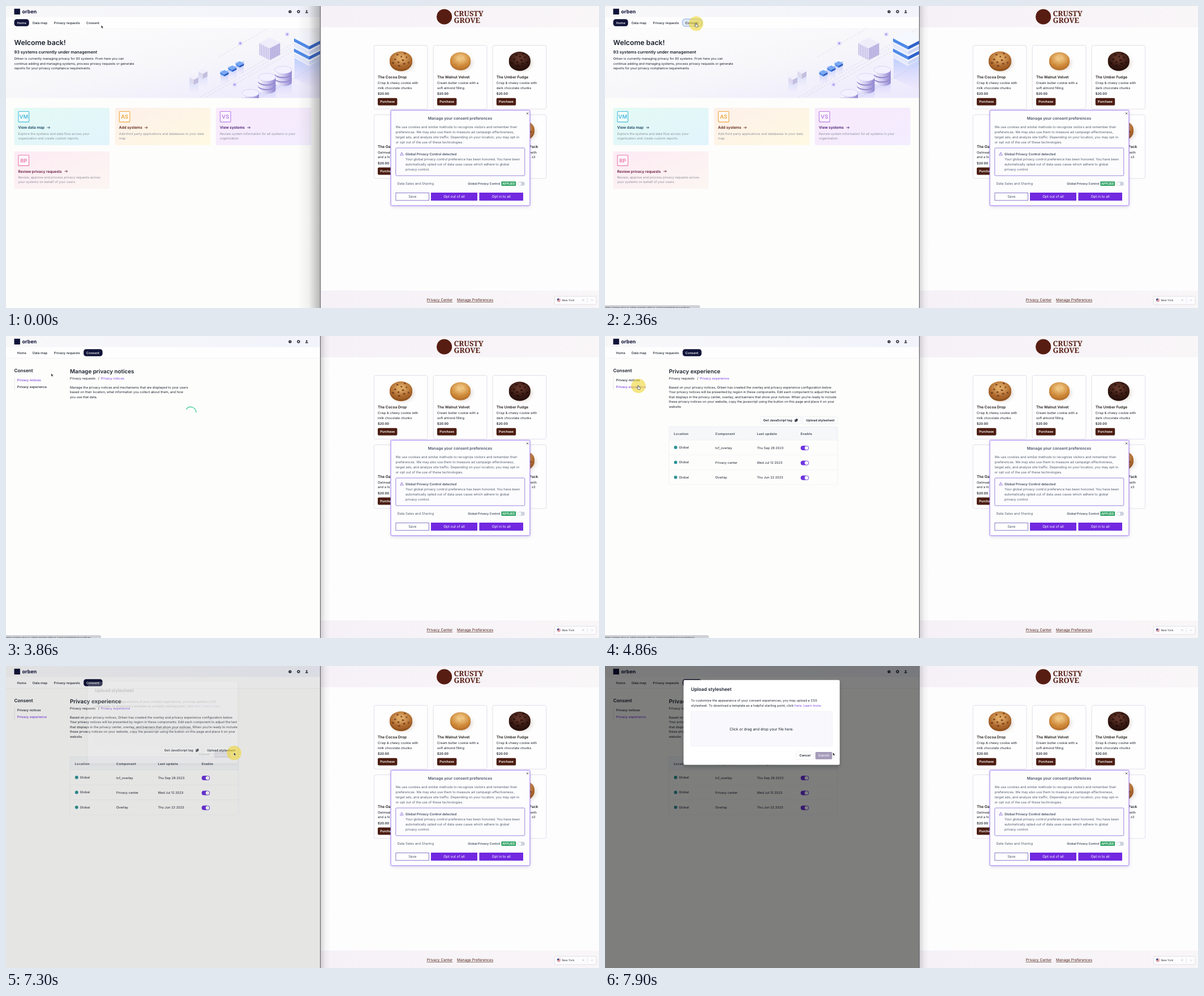
Recreate the animation shown at these times as an HTML page. Size 1048x534 px, loop 8 s.

```html
<!DOCTYPE html>
<html lang="en">
<head>
<meta charset="utf-8">
<title>Consent settings walkthrough</title>
<style>
html, body { margin: 0; width: 100%; height: 100%; overflow: hidden; background: #fdfdfc; }
svg { display: block; width: 1048px; height: 534px; font-family: Inter, "Open Sans", sans-serif; text-rendering: geometricPrecision; }
text { white-space: pre; }
</style>
</head>
<body>
<svg id="stage" viewBox="0 0 1048 534"></svg>
<script>
const LOOP = 8000;
const SM = 5.72, MD = 6.54, LG = 8.18, XL = 9.82;
const INK = '#1a202c', NAVY = '#111439', PURPLE = '#7c3fe0', BROWN = '#4c1d12', SLATE = '#525c6c';

// ---- drawing helpers (text is placed by the middle of its capitals) ----
const text = (x, y, str, size = SM, fill = INK, weight = 400, more = '') =>
  `<text x="${x}" y="${(y + size * .36).toFixed(2)}" font-size="${size}" fill="${fill}" font-weight="${weight}" ${more}>${str}</text>`;
const mid = (x, y, str, size, fill, weight) => text(x, y, str, size, fill, weight, 'text-anchor="middle"');
const lines = (x, y, step, rows, size, fill) => rows.map((r, i) => text(x, y + i * step, r, size, fill)).join('');
const rect = (x, y, w, h, fill, r = 0, more = '') =>
  `<rect x="${x}" y="${y}" width="${w}" height="${h}" rx="${r}" fill="${fill}" ${more}/>`;
const path = (d, fill, more = '') => `<path d="${d}" fill="${fill}" ${more}/>`;
const stroke = (d, color, w = 1, more = '') => path(d, 'none', `stroke="${color}" stroke-width="${w}" ${more}`);
const ellipse = (x, y, rx, ry, fill, more = '') => `<ellipse cx="${x}" cy="${y}" rx="${rx}" ry="${ry}" fill="${fill}" ${more}/>`;
const dot = (x, y, r, fill, more) => ellipse(x, y, r, r, fill, more);
const group = (id, body, more = '') => `<g id="${id}" ${more}>${body}</g>`;
const linear = (id, dir, ...stops) => `<linearGradient id="${id}" ${dir}>${stops.map((s, i) =>
  `<stop offset="${i / (stops.length - 1)}" stop-color="${s[0]}" stop-opacity="${s[1] ?? 1}"/>`).join('')}</linearGradient>`;
const radial = (id, a, b) => `<radialGradient id="${id}" cy=".38"><stop offset=".25" stop-color="${a}"/><stop offset="1" stop-color="${b}"/></radialGradient>`;

const ACROSS = 'x2="1" y2="0"', DOWN = 'x2="0" y2="1"', SLANT = 'x2="1" y2="1"';
const defs = `<defs>
  ${linear('top', ACROSS, ['#f8f8f9'], ['#f2f3fb'])}
  ${linear('hero', SLANT, ['#fdfdfd'], ['#f7f7fa'], ['#ece8fd'])}
  ${linear('shop', ACROSS, ['#f5f1f7'], ['#f9f6f8'])}
  ${linear('vm', SLANT, ['#e3faf4'], ['#e2f4fc'])}
  ${linear('as', SLANT, ['#fdf0ea'], ['#fff9e2'])}
  ${linear('vs', SLANT, ['#f8e9fb'], ['#f3edff'])}
  ${linear('rp', SLANT, ['#fdebf4'], ['#fcf6f2'])}
  ${linear('shadeL', ACROSS, ['#444', 0], ['#444', .07], ['#444', .38])}
  ${linear('shadeR', ACROSS, ['#444', .2], ['#444', .05], ['#444', 0])}
  ${linear('side', ACROSS, ['#fbfaff'], ['#cfc8ee'], ['#8f83cf'])}
  ${linear('glow', DOWN, ['#7fa8ff', .45], ['#b9a6ff', 0])}
  ${radial('cookie0', '#dfa863', '#a9642a')}
  ${radial('cookie1', '#efc582', '#cb8434')}
  ${radial('cookie2', '#603429', '#32160f')}
  <clipPath id="heroClip"><rect y="40" width="555" height="122.5"/></clipPath>
  <filter id="soft" x="-20%" y="-20%" width="140%" height="140%"><feGaussianBlur stdDeviation="3"/></filter>
</defs>`;

// ---- hero illustration ----
function block(x, y, w, h, top, left, right) {
  const k = w * .52;
  return path(`M${x - w} ${y}L${x} ${y + k}V${y + k + h}L${x - w} ${y + h}Z`, left)
    + path(`M${x + w} ${y}L${x} ${y + k}V${y + k + h}L${x + w} ${y + h}Z`, right)
    + path(`M${x} ${y - k}L${x + w} ${y}L${x} ${y + k}L${x - w} ${y}Z`, top);
}
function drum(x, y, r, count) {
  let out = rect(x - r, y + 12, r * 2, 32, 'url(#glow)');
  for (let i = count - 1; i >= 0; i--) {
    const b = y + i * 8;
    out += path(`M${x - r} ${b}V${b + 6}A${r} ${r * .45} 0 0 0 ${x + r} ${b + 6}V${b}Z`, 'url(#side)')
      + ellipse(x, b, r, r * .45, i ? '#8d82c8' : '#f3f0ff', 'stroke="#c2b8ee" stroke-width=".5"');
  }
  return out;
}
function art() {
  let out = '';
  for (const d of ['M300 186L555 39', 'M345 166L505 74', 'M376 90L462 40', 'M404 139L556 51', 'M440 168L556 101'])
    out += stroke(d, '#c9c6d8', .6, 'stroke-dasharray="3 2.4"');
  out += path('M510 92L535 106L560 92V150L535 140L510 128Z', 'url(#glow)');
  for (let i = 3; i >= 0; i--)
    out += block(536, 57 + i * 9, 27, 6, i ? '#eef2ff' : '#f6f8ff', i % 2 ? '#e3e8fb' : '#4f8ae8', i % 2 ? '#cbd5f5' : '#2f62c9');
  out += block(466, 65, 18.5, 21, '#f0edfb', '#e2def5', '#c4bde6');
  for (let i = 0; i < 6; i++)
    out += stroke(`M${448.5 + i * 3} ${67 + i * 1.55}v20M${483.5 - i * 3} ${67 + i * 1.55}v20`, '#a9a1d6', .7);
  for (const [x, y] of [[413, 97], [400, 104.5], [386, 112.5]])
    out += rect(x - 7, y + 6, 14, 18, 'url(#glow)')
      + block(x, y, 7.5, 3, '#f5f8ff', '#dbe6fd', '#b5c9f5') + block(x, y + 4.5, 7.5, 3.5, '#7aa8f3', '#4d88e6', '#2c5cc0');
  for (const [x, y] of [[348, 115.5], [332, 126]])
    out += rect(x - 8, y + 8, 16, 20, 'url(#glow)', 0, 'opacity=".5"') + block(x, y, 8, 9, '#f1effa', '#dedaf0', '#c3bedf');
  out += drum(490, 113, 15, 3) + drum(461, 126, 15.5, 3) + drum(432, 154, 15, 2);
  for (const [x, y] of [[414, 66], [497, 50], [404, 139]])
    out += dot(x, y, 4, '#d9ceff', 'opacity=".55"') + dot(x, y, 1.6, '#9a83ec');
  return out;
}

// ---- left window ----
const arrow = (x, y, c) => stroke(`M${x} ${y}h5M${x + 3} ${y - 2}l2 2l-2 2`, c, .8);
function card(x, y, id, mark, title, ax, tone, ink, rows) {
  return rect(x, y, 168.5, 66, `url(#${id})`, 2)
    + rect(x + 7.5, y + 6.5, 18.6, 18.6, '#fff8', 1, `stroke="${tone}" stroke-width="1.1"`)
    + mid(x + 16.8, y + 16, mark, 9.4, tone, 600)
    + text(x + 7, y + 35, title, MD, ink, 600) + arrow(ax, y + 35, ink)
    + lines(x + 7, y + 45.8, 8.2, rows, SM, '#8a909c');
}
const homePage = rect(0, 39.5, 555, 123, 'url(#hero)')
  + `<g clip-path="url(#heroClip)">${art()}</g>`
  + text(14.5, 65, 'Welcome back!', 12.27, INK, 600)
  + text(14.5, 81.6, '93 systems currently under management', 7.36, INK, 600)
  + lines(14.5, 93, 8.6, ['Orben is currently managing privacy for 93 systems. From here you can',
    'continue adding and managing systems, process privacy requests or generate',
    'reports for your privacy compliance requirements.'])
  + card(14.5, 180, 'vm', 'VM', 'View data map', 72.5, '#45b8dc', '#14405c',
    ['Explore the systems and data flow across your', 'organization and create custom reports.'])
  + card(192.8, 180, 'as', 'AS', 'Add systems', 245, '#eda83c', '#5c1c12',
    ['Add third party applications and databases to your data', 'map'])
  + card(371, 180, 'vs', 'VS', 'View systems', 426.5, '#b97be6', '#43166e',
    ['Review system information for all systems in your', 'organization'])
  + card(14.5, 257.3, 'rp', 'RP', 'Review privacy requests', 103.5, '#ea78ad', '#64143f',
    ['Review, approve and process privacy requests across', 'your systems on behalf of your users.']);

const pageHead = (title, crumb) => text(113, 62, title, XL, INK, 600)
  + text(113, 75.4, 'Privacy requests') + text(162.7, 75.4, '/') + text(167.7, 75.4, crumb, SM, PURPLE);

const noticesPage = pageHead('Manage privacy notices', 'Privacy notices')
  + lines(113, 90.6, 8.6, ['Manage the privacy notices and mechanisms that are displayed to your users',
    'based on their location, what information you collect about them, and how', 'you use that data.'])
  + group('spinner', stroke('M-7.8 -5.4A9.5 9.5 0 0 1 9.5 0', '#2cc78c', 1.1, 'stroke-linecap="round"'));

const row = (y, name, date) => dot(124.8, y, 2.9, '#2d8fb4') + path(`M122.5 ${y - 1.5}q2 -1.6 3 0t-.8 3.4q-2 -.6 -2.2 -3.4`, '#2f9d63')
  + text(130.8, y, 'Global') + text(195, y + .6, name) + text(268.5, y + .6, date)
  + rect(345.8, y - 3, 14.4, 8, '#6d35dd', 4) + dot(356.1, y + 1, 3.2, '#fff')
  + stroke(`M113 ${y + 13.2}H411`, '#eceef2', .6);
const head = (x, s) => text(x, 172.8, s, SM, '#374151', 600, 'letter-spacing=".29"');
const button = (x, w, id = '') => rect(x, 142.8, w, 12.6, '#fefefe', 1.5, `id="${id}" stroke="#dfe3ea" stroke-width=".6"`);
const experiencePage = pageHead('Privacy experience', 'Privacy experience')
  + lines(113, 90.6, 8.6, ['Based on your privacy notices, Orben has created the overlay and privacy experience configuration below.',
    'Your privacy notices will be presented by region in these components. Edit each component to adjust the text',
    'that displays in the privacy center, overlay, and banners that show your notices. When you’re ready to include',
    'these privacy notices on your website, copy the javascript using the button on this page and place it on your',
    'website.'])
  + button(274.6, 71.6, 'copy') + text(279.8, 149, 'Get JavaScript tag', SM, INK, 600)
  + rect(335.4, 147.4, 3.4, 4.4, INK, .5) + rect(337.2, 146.2, 3.4, 4.4, INK, .5, 'stroke="#fff" stroke-width=".4"')
  + button(349.6, 61.4, 'upload') + mid(380.4, 149, 'Upload stylesheet', SM, INK, 600)
  + rect(113, 160.5, 298, 23.4, '#f6f7f9', 1) + stroke('M113 263V160.5H411V263M113 184H411', '#e7e9ee', .6)
  + head(121.6, 'Location') + head(195, 'Component') + head(268.5, 'Last update') + head(345.8, 'Enable')
  + row(197, 'tcf_overlay', 'Thu Sep 28 2023') + row(223.4, 'Privacy center', 'Wed Jul 12 2023') + row(249.8, 'Overlay', 'Thu Jun 22 2023');

const sideMenu = text(14.5, 61, 'Consent', LG, INK, 600) + stroke('M15 72.5V96', '#d9dbe3', .7)
  + text(19.8, 78.3, 'Privacy notices', SM, INK, 500, 'id="linkN"')
  + text(19.8, 89.8, 'Privacy experience', SM, INK, 500, 'id="linkE"');

const topBar = rect(0, 0, 555, 19.8, 'url(#top)') + rect(0, 19.8, 555, 19.7, '#fefefe') + stroke('M0 39.5H555', '#ececf0', .6)
  + rect(14.5, 4.8, 10.4, 10.2, NAVY) + text(28.6, 10, 'orben', 8.9, NAVY, 700)
  + dot(502, 10, 2.6, INK) + mid(502, 10.1, '?', 4, '#fff', 700)
  + dot(517, 10, 1.8, 'none', `stroke="${INK}" stroke-width="1.3"`) + dot(517, 10, 2.7, 'none', `stroke="${INK}" stroke-width=".7" stroke-dasharray="1.1 1.02"`)
  + dot(531.4, 8.7, 1.3, INK) + path('M528.9 12.6q0 -2.2 2.5 -2.2t2.5 2.2Z', INK)
  + rect(137.2, 23.3, 34, 12.4, '#dfe7f1', 4.5, 'id="hover"') + rect(136.8, 22.9, 34.8, 13.2, 'none', 5, 'id="ring" stroke="#93b9ea" stroke-width="1.2"')
  + rect(14.5, 23.3, 26.2, 12.4, NAVY, 4.5, 'id="pill"')
  + text(19.6, 29.5, 'Home', SM, INK, 500, 'id="navH"') + text(47, 29.5, 'Data map', SM, INK, 500)
  + text(84.8, 29.5, 'Privacy requests', SM, INK, 500) + text(142, 29.5, 'Consent', SM, INK, 500, 'id="navC"');

const modal = rect(139, 28, 276, 150, '#000', 2, 'opacity=".22" filter="url(#soft)"') + rect(138.8, 24.8, 276, 150, '#fff', 2.2)
  + text(152, 40.8, 'Upload stylesheet', LG, INK, 600)
  + text(152, 61, 'To customize the appearance of your consent experiences, you may upload a CSS')
  + text(152, 69.6, `stylesheet. To download a template as a helpful starting point, click <tspan fill="${PURPLE}">here</tspan>. <tspan fill="${PURPLE}">Learn more</tspan>.`)
  + rect(152, 80.8, 249.6, 60.8, '#f9f9fd', 1.5, 'stroke="#d5d7e6" stroke-width=".6" stroke-dasharray="1.6 1.2"')
  + mid(276.8, 111.2, 'Click or drag and drop your file here.', MD, INK, 400)
  + rect(337.6, 152, 31.6, 13, '#fff', 1.5, 'stroke="#e4e6ec" stroke-width=".6"') + mid(353.3, 158.4, 'Cancel', SM, INK, 600)
  + rect(371.8, 152, 29.6, 13, '#a59cb9', 1.5) + mid(386.6, 158.4, 'Submit', SM, '#e9e5f1', 600);

// ---- right window ----
function cookie(x, y, kind) {
  const [rx, ry] = [[20, 16.5], [18, 15], [19, 16]][kind];
  const chip = ['#6e3a1b', '#dca255', '#1f0c08'][kind];
  let out = ellipse(x + 3, y + 4, rx, ry - 2, '#8a6a50', 'opacity=".25" filter="url(#soft)"')
    + ellipse(x, y + 2, rx, ry, ['#94551f', '#b87430', '#28100b'][kind]) + ellipse(x, y - 1, rx, ry - 1, `url(#cookie${kind})`);
  for (let i = 0; i < 11; i++) {
    const a = i * 2.4, d = Math.sqrt((i + .5) / 11) * .82;
    out += ellipse((x + Math.cos(a) * d * rx).toFixed(1), (y - 1 + Math.sin(a) * d * ry).toFixed(1), 2.2 - i % 3 * .4, 1.5, chip, `opacity="${kind == 1 ? .45 : .85}"`);
  }
  return out;
}
const frame = (x, y) => rect(x + .3, y + .3, 94.6, 112.6, '#fefefe', 3, 'stroke="#d8d2e2" stroke-width=".7"');
const product = (x, y, kind, name, rows) => frame(x, y) + cookie(x + 48, y + 27.5, kind)
  + text(x + 7, y + 56.2, name, MD, '#1d1714', 600) + lines(x + 7, y + 67, 8.3, rows)
  + text(x + 7, y + 85.7, '$20.00', SM, INK, 600)
  + rect(x + 7, y + 93.4, 34.4, 13, BROWN, 2) + mid(x + 24.2, y + 100, 'Purchase', SM, '#fff', 600);
const endText = (x, y, s, size, w) => text(x, y, s, size, INK, w, 'text-anchor="end"');
const action = (x, w, s) => rect(x, 330, w, 14.2, '#7128e0') + mid(x + w / 2, 337.2, s, 6.2, '#fff', 400);

const shop = rect(556, 0, 492, 534, '#fdfdfd') + rect(556, 0, 492, 37.6, 'url(#shop)')
  + dot(774.6, 19, 13.6, '#571d12')
  + text(791.5, 13, 'CRUSTY', 13, '#571d12', 700, 'font-family="Noto Serif, serif"')
  + text(791.5, 25.6, 'GROVE', 13, '#571d12', 700, 'font-family="Noto Serif, serif"')
  + product(650, 69.3, 0, 'The Cocoa Drop', ['Crisp &amp; chewy cookie with', 'milk chocolate chunks'])
  + product(755, 69.3, 1, 'The Walnut Velvet', ['Cream butter cookie with a', 'soft almond filling'])
  + product(859.8, 69.3, 2, 'The Umber Fudge', ['Crisp &amp; chewy cookie with', 'dark chocolate chunks'])
  + product(650, 192, 1, 'The Oa', ['Oatmeal', 'and a hi'])
  + frame(859.8, 192) + cookie(914, 219.5, 0) + endText(940.3, 248.2, 'Pack', MD, 600) + endText(938, 259, 'with', SM, 400) + endText(935.6, 267.3, 'x3', SM, 400);

const consentBox = rect(681, 187, 245, 168, '#5b4a90', 2, 'opacity=".22" filter="url(#soft)"')
  + rect(680, 184.2, 246, 168.8, '#fdfdfe', 1.5, 'stroke="#9a73ee" stroke-width="1"')
  + stroke('M920 188.4l3.2 3.2m0 -3.2l-3.2 3.2', '#222', .8)
  + mid(802.6, 199, 'Manage your consent preferences', 6.85, '#475064', 600)
  + lines(688.6, 213.7, 8.95, ['We use cookies and similar methods to recognize visitors and remember their',
    'preferences. We may also use them to measure ad campaign effectiveness,',
    'target ads, and analyze site traffic. Depending on your location, you may opt-in',
    'or opt out of the use of these technologies.'], 5.87, SLATE)
  + rect(688.8, 251, 228, 49, '#fcfcff', 1.5, 'stroke="#8f74d8" stroke-width=".9"')
  + stroke('M699.4 258.6l3 5.3h-6ZM699.4 260.6v1.6M699.4 262.7v.5', '#7a55d0', .65)
  + text(706, 262.2, 'Global Privacy Control detected', 5.9, '#434c5e', 600)
  + lines(706, 271.2, 8.9, ['Your global privacy control preference has been honored. You have been',
    'automatically opted out of data uses cases which adhere to global', 'privacy control.'], 5.87, SLATE)
  + text(691.6, 314.2, 'Data Sales and Sharing', 5.9, SLATE)
  + text(816.3, 314.2, 'Global Privacy Control', 5.3, '#434c5e', 600)
  + rect(875.4, 310.3, 25.8, 7.8, '#32a466', 1) + mid(888.3, 314.3, 'APPLIED', 5.3, '#fff', 600)
  + rect(904, 310.8, 13, 7, '#cdd2de', 3.5) + dot(907.6, 314.3, 2.9, '#fff')
  + rect(688.9, 330.4, 58.6, 13.4, '#fefefe', 0, 'stroke="#7d6cc0" stroke-width=".9"') + mid(718.2, 337.2, 'Save', 6.1, '#475064', 400)
  + action(751, 82, 'Opt out of all') + action(836.4, 77.6, 'Opt in to all');

const shopFoot = rect(556, 503, 492, 31, 'url(#shop)')
  + text(743.7, 520, 'Privacy Center', MD, BROWN, 400, 'text-decoration="underline"')
  + text(797, 520, 'Manage Preferences', MD, BROWN, 400, 'text-decoration="underline"')
  + rect(969.3, 513.3, 73.8, 14.6, '#fcfbfd', 1.5, 'stroke="#d9d6de" stroke-width=".7"')
  + dot(977, 520.2, 3.2, '#f3eef0') + stroke('M975 518.2h4.6M974 520.2h6M974.6 522.2h4.8', '#cf4a55', .9) + path('M977 517v3.2h-3.2a3.2 3.2 0 0 1 3.2 -3.2', '#33508f')
  + text(982.4, 520.2, 'New York', 4.85, '#333')
  + stroke('M1018.6 518.6l3 3m0 -3l-3 3M1033.8 519.3l1.9 1.8l1.9 -1.8', '#b4b4bb', .7) + stroke('M1027.6 516v8.4', '#d4d4da', .6);

// ---- status line and pointer ----
const status = group('status', path('M0 529H165.500q2.500 0 2.500 2.500V534H0Z', '#cfd1d6', 'id="statusBg"')
  + text(.5, 532.8, '', 4.75, '#3f4248', 400, 'id="statusText" font-family="Liberation Sans, Arial, sans-serif"'));
const pointer = group('pointer',
  group('arrow', path('M0 0V5.300L1.250 4.200L2.150 6.200L3.100 5.800L2.250 3.850H3.900Z', '#111', 'stroke="#fff" stroke-width=".5"'))
  + group('hand', path('M-.7 .6a.7 .7 0 0 1 1.400 0V2.500l2 .4q1 .3 .9 1.300L3.200 6.800H-.7L-2.700 3.900q.5 -1 1.400 -.2l.6 .6Z', '#fff', 'stroke="#222" stroke-width=".65" stroke-linejoin="round"')));

const stage = document.getElementById('stage');
stage.innerHTML = defs + rect(0, 0, 555, 534, '#fdfdfc') + topBar + group('home', homePage)
  + group('consent', sideMenu + group('notices', noticesPage) + group('experience', experiencePage))
  + status + rect(0, 0, 555, 534, '#000', 0, 'id="dim"') + group('modal', modal)
  + rect(515, 0, 40, 534, 'url(#shadeL)', 0, 'id="behind"')
  + shop + consentBox + shopFoot + rect(556, 0, 17, 534, 'url(#shadeR)', 0, 'id="front"')
  + rect(555, 0, 1.1, 534, '#66666c') + dot(0, 0, 12.8, '#efd52e', 'id="halo"') + pointer;

// ---- motion ----
const el = Object.fromEntries([...stage.querySelectorAll('[id]')].map(n => [n.id, n]));
const clamp = v => Math.min(1, Math.max(0, v));
const ramp = (t, a, b) => clamp((t - a) / (b - a));
const show = (node, on) => node.setAttribute('visibility', on ? 'inherit' : 'hidden');
const within = (t, spans) => spans.some(([a, b]) => t >= a && t < b);
const ease = { both: u => u * u * (3 - 2 * u), start: u => u * u, end: u => 1 - (1 - u) ** 2 };

const track = [[0, 168.3, 34], [600, 168.3, 34], [1300, 160.7, 30.3, 'both'], [3520, 160.7, 30.3], [3860, 80, 66, 'start'],
  [4200, 58.7, 87.5, 'end'], [5460, 58.7, 87.5], [6280, 368, 143.5, 'both'], [6560, 368, 143.5], [7060, 402.8, 153, 'both'], [LOOP, 402.8, 153]];
const presses = [[2230, 2450, 2750], [4660, 4900, 5160], [7180, 7400, 7650]];
const handTimes = [[800, 3600], [4100, 5580], [6200, 7290]];
const SITE = 'https://orben-plus-rc.orben-staging.ethyca.com/consent/privacy-';

function place(t) {
  const i = Math.max(1, track.findIndex(k => k[0] > t));
  const [t0, x0, y0] = track[i - 1], [t1, x1, y1, kind] = track[i];
  const u = ease[kind || 'both'](ramp(t, t0, t1));
  return [x0 + (x1 - x0) * u, y0 + (y1 - y0) * u];
}
// cubic-bezier(0, 0, .2, 1)
function settle(x) {
  let a = 0, b = 1;
  for (let i = 0; i < 20; i++) {
    const s = (a + b) / 2;
    if (.6 * (1 - s) * s * s + s ** 3 < x) a = s; else b = s;
  }
  return 3 * (1 - a) * a * a + a ** 3;
}

function draw(t) {
  const onConsent = t >= 3200, onExperience = t >= 4780, focused = t >= 2200;
  show(el.home, !onConsent);
  show(el.consent, onConsent);
  show(el.notices, onConsent && !onExperience);
  show(el.experience, onExperience);
  show(el.behind, !focused);
  show(el.front, focused);

  el.pill.setAttribute('x', onConsent ? 137.2 : 14.5);
  el.pill.setAttribute('width', onConsent ? 33.4 : 26.2);
  el.navH.setAttribute('fill', onConsent ? INK : '#fff');
  el.navC.setAttribute('fill', onConsent ? '#fff' : INK);
  el.linkN.setAttribute('fill', onExperience ? INK : PURPLE);
  el.linkE.setAttribute('fill', onExperience ? PURPLE : INK);
  el.hover.setAttribute('opacity', onConsent ? 0 : ramp(t, 800, 1000));
  show(el.ring, t >= 2230 && !onConsent);
  el.upload.setAttribute('fill', within(t, [[6200, 7290]]) ? '#e2e5eb' : '#fefefe');
  el.spinner.setAttribute('transform', `translate(326.4 135) rotate(${(t - 3860) / 650 * 360})`);

  const far = t >= 4250;
  show(el.status, within(t, [[850, 3950], [4250, 5800]]));
  el.statusText.textContent = SITE + (far ? 'experience' : 'notices');
  el.statusBg.setAttribute('transform', `scale(${far ? 183.5 / 168 : 1} 1)`);

  const p = settle(ramp(t, 7290, 7490));
  el.dim.setAttribute('opacity', .5 * p);
  el.modal.setAttribute('opacity', p);
  el.modal.setAttribute('transform', `translate(277 100) scale(${.95 + .05 * p}) translate(-277 -100)`);

  const [x, y] = place(t), hand = within(t, handTimes);
  el.pointer.setAttribute('transform', `translate(${x} ${y})`);
  show(el.hand, hand);
  show(el.arrow, !hand);
  const glow = presses.reduce((g, [a, b, c]) => Math.max(g, Math.min(ramp(t, a, a + 80), 1 - ramp(t, b, c))), 0);
  el.halo.setAttribute('transform', `translate(${x + .3} ${y + .8})`);
  el.halo.setAttribute('opacity', .58 * glow);
}

const begin = performance.now();
(function tick() {
  draw((performance.now() - begin) % LOOP);
  requestAnimationFrame(tick);
})();
</script>
</body>
</html>
```
